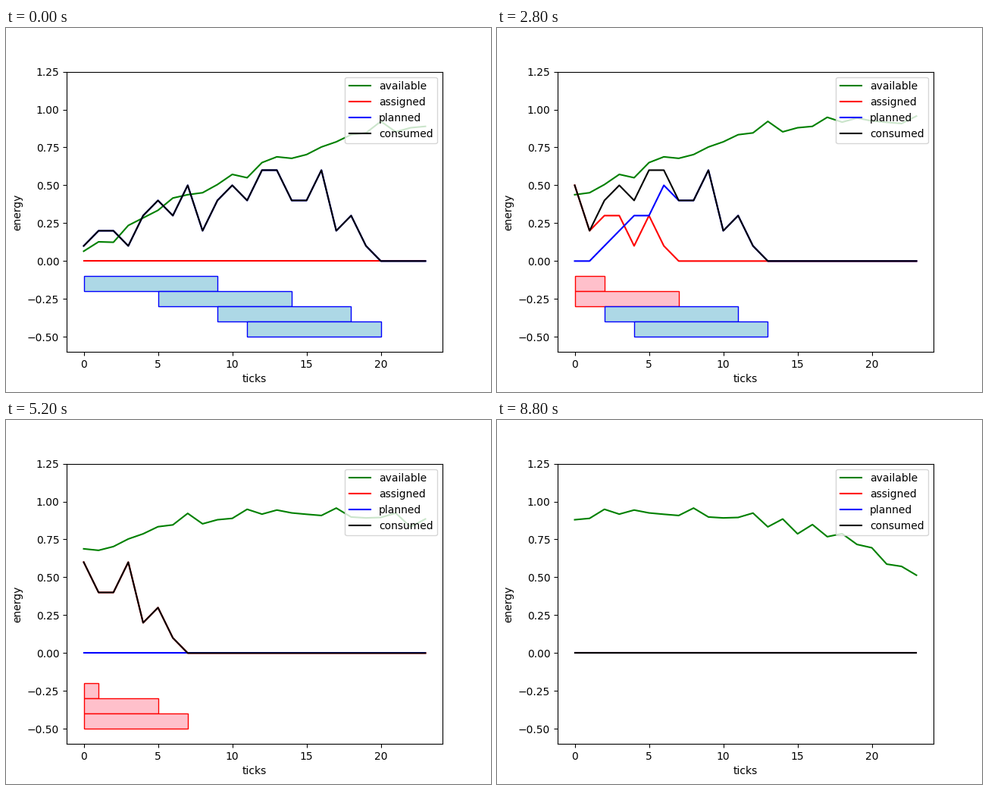
Write a matplotlib script that moves like this. It is 640 px wide and 480 px high and loops after 9200 ms.

```python
import numpy as np
import matplotlib.pyplot as plt
from matplotlib.animation import FuncAnimation
from matplotlib.patches import Rectangle

WINDOW = 24
STEPS = 23
PROFILE = np.array([0.1, 0.2, 0.2, 0.1, 0.3, 0.3, 0.1, 0.3, 0.1])
STARTS = [0, 5, 9, 11]
AVAILABLE = np.array([
    0.065, 0.127, 0.124, 0.235, 0.285, 0.335, 0.416, 0.438, 0.451, 0.505,
    0.572, 0.550, 0.650, 0.688, 0.678, 0.703, 0.753, 0.787, 0.834, 0.846,
    0.922, 0.853, 0.880, 0.889, 0.949, 0.917, 0.944, 0.925, 0.916, 0.908,
    0.957, 0.898, 0.892, 0.895, 0.924, 0.833, 0.885, 0.787, 0.848, 0.768,
    0.788, 0.717, 0.695, 0.587, 0.572, 0.514])


def load(start):
    """Energy drawn at every tick by a job beginning at the given tick."""
    series = np.zeros(len(AVAILABLE))
    series[start:start + len(PROFILE)] = PROFILE
    return series


LOADS = [load(start) for start in STARTS]

plt.rcParams["font.family"] = "DejaVu Sans"
fig, ax = plt.subplots(figsize=(6.4, 4.8), dpi=100)
ax.set_xlim(-1.15, 24.15)
ax.set_ylim(-0.6, 1.25)
ax.set_xlabel("ticks")
ax.set_ylabel("energy")

x = np.arange(WINDOW)
lines = {name: ax.plot(x, np.zeros(WINDOW), color=color, label=name)[0]
         for name, color in [("available", "green"), ("assigned", "red"),
                             ("planned", "blue"), ("consumed", "black")]}
bars = [ax.add_patch(Rectangle((0, -0.2 - 0.1 * row), 1, 0.1))
        for row in range(len(STARTS))]
ax.legend(loc="upper right")


def update(tick):
    window = slice(tick, tick + WINDOW)
    assigned, planned = np.zeros(WINDOW), np.zeros(WINDOW)
    for start, series, bar in zip(STARTS, LOADS, bars):
        running = start < tick
        if running:
            assigned += series[window]
        else:
            planned += series[window]
        left = max(start - tick, 0)
        right = start + len(PROFILE) - tick
        bar.set_visible(right > 0)
        bar.set_x(left)
        bar.set_width(max(right - left, 0))
        bar.set_facecolor("pink" if running else "lightblue")
        bar.set_edgecolor("red" if running else "blue")
    lines["available"].set_ydata(AVAILABLE[window])
    lines["assigned"].set_ydata(assigned)
    lines["planned"].set_ydata(planned)
    lines["consumed"].set_ydata(assigned + planned)
    return [*lines.values(), *bars]


anim = FuncAnimation(fig, update, frames=STEPS, interval=400,
                     repeat=True, repeat_delay=0)
plt.show()
```
